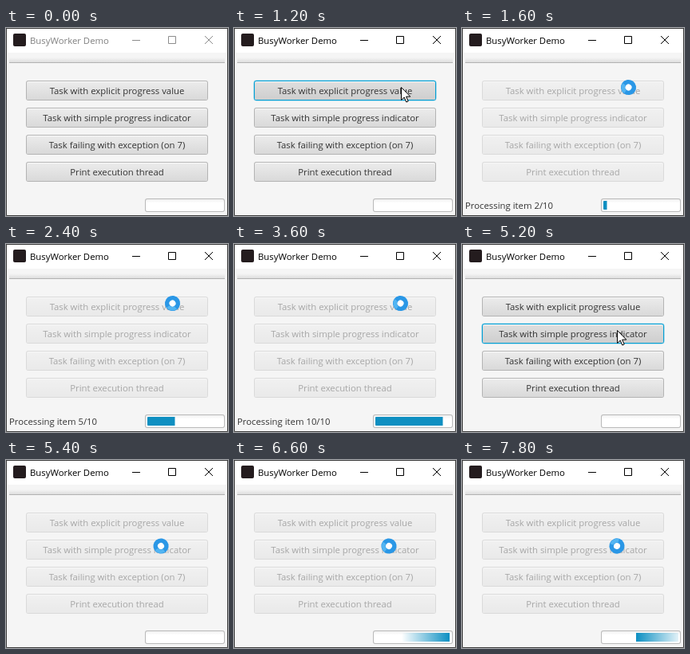
An HTML page that plays this animation: 278x236 px, repeating every 8 s.

```html
<!DOCTYPE html>
<html lang="en">
<head>
<meta charset="utf-8">
<title>BusyWorker Demo</title>
<style>
  html, body { margin: 0; width: 100%; height: 100%; overflow: hidden; background: #f5f5f5; }
  svg { display: block; width: 278px; height: 236px; }
  text { font: 11.35px "Open Sans", "Noto Sans", sans-serif; fill: #333; }
  .edge { fill: #b4b4b4; }
  .shine { fill: #fafafa; }
  .face { fill: url(#face); }
  .ring { fill: none; stroke: none; }
  .hover .face { fill: url(#faceHover); }
  .pressed .face { fill: url(#facePressed); }
  .focus .edge { fill: #039ed3; }
  .focus .ring { stroke: #039ed3; stroke-opacity: .25; }
  .disabled { opacity: .4; }
  .controls { fill: none; stroke: #000; }
  #title { fill: #000; }
  .inactive #title { fill: #808080; }
  .inactive .controls { stroke: #8c8c8c; }
</style>
</head>
<body>
<svg id="stage" viewBox="0 0 278 236">
  <defs>
    <linearGradient id="face" x2="0" y2="1"><stop stop-color="#ebebeb"/><stop offset="1" stop-color="#d9d9d9"/></linearGradient>
    <linearGradient id="faceHover" x2="0" y2="1"><stop stop-color="#f8f8f8"/><stop offset="1" stop-color="#e6e6e6"/></linearGradient>
    <linearGradient id="facePressed" x2="0" y2="1"><stop stop-color="#dedede"/><stop offset="1" stop-color="#cecece"/></linearGradient>
    <linearGradient id="strip" x2="0" y2="1"><stop stop-color="#f5f5f5"/><stop offset="1" stop-color="#dedede"/></linearGradient>
    <linearGradient id="track" x2="0" y2="1"><stop stop-color="#f0f0f0"/><stop offset=".3" stop-color="#fff"/></linearGradient>
    <linearGradient id="toRight"><stop stop-color="#0c8fc2" stop-opacity="0"/><stop offset="1" stop-color="#0c8fc2"/></linearGradient>
    <linearGradient id="toLeft"><stop stop-color="#0c8fc2"/><stop offset="1" stop-color="#0c8fc2" stop-opacity="0"/></linearGradient>
    <clipPath id="inner"><rect x="177" y="217" width="94" height="11" rx="1"/></clipPath>
  </defs>

  <rect width="278" height="236" fill="#f5f5f5"/>
  <rect width="278" height="31" fill="#fff"/>
  <rect x="9" y="7" width="16" height="16" rx="2" fill="#241c1e"/>
  <text id="title" x="30" y="20">BusyWorker Demo</text>
  <g class="controls">
    <path d="M158 15.5h10M203.5 10.5h9v9h-9z"/>
    <path d="M249 10l10 10M259 10l-10 10"/>
  </g>

  <rect x="4" y="37" width="270" height="6" fill="url(#strip)"/>
  <rect x="4" y="43" width="270" height="1" fill="#b2b2b2"/>

  <g id="buttons"></g>

  <text id="status" x="4" y="227"></text>
  <rect x="174" y="214" width="100" height="17" rx="3" fill="#b9b9b9"/>
  <rect x="175" y="215" width="98" height="15" rx="2" fill="url(#track)"/>
  <g clip-path="url(#inner)"><rect id="bar" y="217" height="11"/></g>

  <path id="arrow" d="M.5 .5v16l3.7-3.5 2.6 6 2.4-1-2.6-5.9h5.2z" fill="#fff" stroke="#000"/>
  <g id="busy" fill="none">
    <circle r="4.5" fill="#fff"/>
    <circle r="6.8" stroke="#2a97e6" stroke-width="5.6"/>
    <path d="M0-6.8A6.8 6.8 0 0 1 6.8 0" stroke="#53b5f2" stroke-width="4.6"/>
  </g>
  <path d="M.5 0v235.5h277V0M0 .5h278" fill="none" stroke="#3c3c3c"/>
</svg>
<script>
const $ = id => document.getElementById(id);
const LOOP = 8000, STEP = 200;
const ITEM_START = 1350, ITEM_TIME = 250, ITEMS = 10;
const ITEMS_END = ITEM_START + ITEMS * ITEM_TIME;
const SLIDE_START = 5240, SLIDE_TURN = 7240, SLIDE_START_X = 74, SLIDE_SPEED = 0.1;

const labels = ["Task with explicit progress value", "Task with simple progress indicator",
  "Task failing with exception (on 7)", "Print execution thread"];
$("buttons").innerHTML = labels.map((label, i) => `
  <g transform="translate(25 ${66 + 34 * i})">
    <rect class="ring" x="-.5" y="-.5" width="229" height="26" rx="4"/>
    <rect class="edge" width="228" height="25" rx="3"/>
    <rect class="shine" x="1" y="1" width="226" height="23" rx="2"/>
    <rect class="face" x="1" y="2" width="226" height="22" rx="2"/>
    <text x="114" y="17" text-anchor="middle">${label}</text>
  </g>`).join("");
const buttons = [...$("buttons").children];

// Pointer path: time, x, y
const path = [[600, 262, 122], [1000, 210, 74], [1400, 208.5, 74.5], [4100, 208.5, 74.5],
  [4600, 195, 102], [5000, 194, 108]];

function pointerAt(t) {
  const next = path.findIndex(p => p[0] > t);
  if (next < 0) return path[path.length - 1].slice(1);
  if (!next) return path[0].slice(1);
  const [t0, x0, y0] = path[next - 1], [t1, x1, y1] = path[next];
  const k = (t - t0) / (t1 - t0), e = k * (2 - k);
  return [x0 + (x1 - x0) * e, y0 + (y1 - y0) * e];
}

function drawBar(x, width, fill) {
  $("bar").setAttribute("x", x);
  $("bar").setAttribute("width", Math.max(0, width));
  $("bar").setAttribute("fill", fill);
}

function draw(t) {
  const counting = t >= ITEM_START && t < ITEMS_END;
  const sliding = t >= 5400;
  const working = counting || sliding;
  const active = t >= 600;
  const [x, y] = pointerAt(t);

  $("stage").classList.toggle("inactive", !active);
  const focused = t < 5200 ? 0 : 1;
  const pressed = t >= 1200 && t < ITEM_START || t >= 5200;
  buttons.forEach((button, i) => {
    const top = 66 + 34 * i;
    const over = active && x >= 25 && x < 253 && y >= top && y < top + 25;
    button.setAttribute("class", working ? "disabled" :
      (active && i === focused ? "focus " : "") + (over ? pressed ? "pressed" : "hover" : ""));
  });

  const done = Math.floor((t - ITEM_START) / ITEM_TIME);
  $("status").textContent = counting ? `Processing item ${done + 1}/${ITEMS}` : "";
  if (counting) {
    drawBar(177, done * 10 - 5.5, "#0f8fc1");
  } else if (sliding) {
    const travel = Math.min(t, 2 * SLIDE_TURN - t) - SLIDE_START;
    drawBar(SLIDE_START_X + travel * SLIDE_SPEED, 60, t < SLIDE_TURN ? "url(#toRight)" : "url(#toLeft)");
  } else {
    drawBar(177, 0, "none");
  }

  $("arrow").setAttribute("visibility", active && !working ? "visible" : "hidden");
  $("arrow").setAttribute("transform", `translate(${Math.round(x)} ${Math.round(y)})`);
  $("busy").setAttribute("visibility", working ? "visible" : "hidden");
  $("busy").setAttribute("transform", `translate(${x} ${y}) rotate(${t * 0.36})`);
}

const start = performance.now();
function tick() {
  const t = (performance.now() - start) % LOOP;
  draw(Math.floor(t / STEP) * STEP);
  requestAnimationFrame(tick);
}
tick();
</script>
</body>
</html>
```
